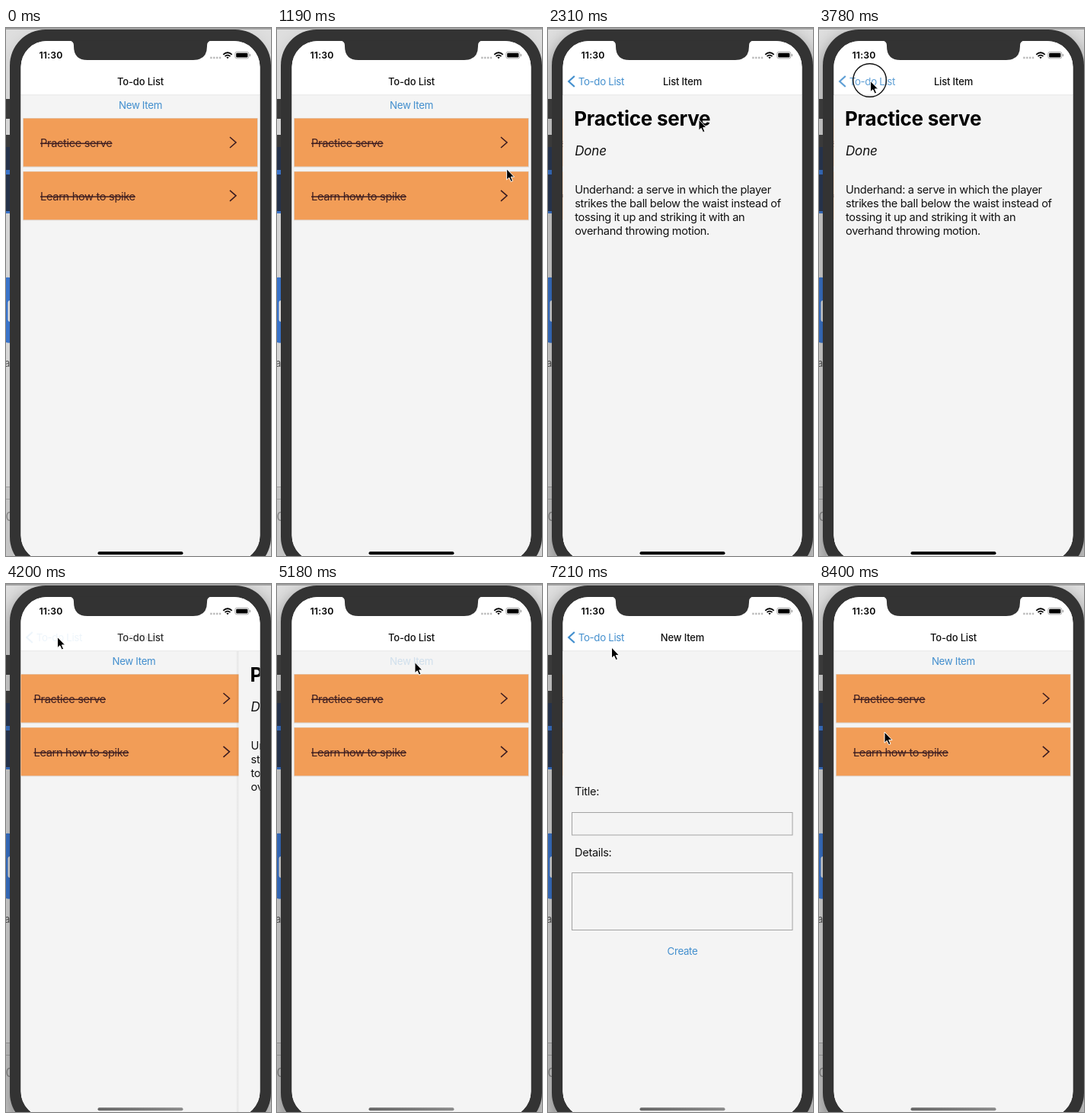
An HTML page that plays this animation: 348 px wide and 692 px high, repeating every 8.47 s.

```html
<!DOCTYPE html>
<html lang="en">
<head>
<meta charset="utf-8">
<title>To-do list</title>
<style>
  html, body { margin: 0; width: 100%; height: 100%; overflow: hidden; background: #333; }
  svg { display: block; width: 348px; height: 692px; }
  text { font-family: Inter, "Open Sans", sans-serif; font-size: 14.6px; letter-spacing: -.32px; fill: #111; }
  .title { font-size: 13px; font-weight: 500; letter-spacing: -.17px; text-anchor: middle; }
  .link { font-size: 13.3px; fill: #438fce; }
  .mid { text-anchor: middle; }
  .item text { fill: #3c1d20; text-decoration: line-through; }
  .item path { fill: none; stroke: #3c1d20; stroke-width: 1.6; }
  .heading { font-size: 26px; font-weight: 700; letter-spacing: -.25px; fill: #000; }
  .status { font-size: 12.3px; font-weight: 600; letter-spacing: .15px; fill: #000; }
  .done { font-size: 17px; font-style: italic; letter-spacing: -.15px; }
  .field { fill: none; stroke: #a3a3a3; }
  .page { fill: #f4f4f4; }
</style>
</head>
<body>
<svg viewBox="0 0 348 692">
  <defs>
    <clipPath id="screen"><rect x="19.5" y="17" width="314" height="682" rx="34"/></clipPath>
    <linearGradient id="edge">
      <stop offset="0" stop-color="#000" stop-opacity="0"/>
      <stop offset="1" stop-color="#000" stop-opacity=".07"/>
    </linearGradient>
    <linearGradient id="barFade">
      <stop offset="0" stop-color="#666"/>
      <stop offset="1" stop-color="#8a8a8a"/>
    </linearGradient>
    <filter id="blur"><feGaussianBlur stdDeviation="10"/></filter>
  </defs>

  <!-- desktop behind the phone -->
  <rect width="348" height="692" fill="#dedede"/>
  <rect y="601" width="10" height="91" fill="#cecece"/>
  <path d="M0 601.5H10M0 617.5H10" stroke="#a5a5a5"/>
  <path d="M0 155H10V243H0ZM0 327Q5 326 10 329V411Q5 414 0 412Z" fill="#3c78d2"/>
  <rect x="2.5" y="357" width="9" height="28" rx="3" fill="#e8e8e8"/>
  <text x="-2" y="444" style="font-size:13px;fill:#555">a</text>
  <text x="-10" y="646" style="font-size:16px;fill:#888">20</text>
  <rect id="shade" x="2" y="8" width="349" height="720" rx="47" filter="url(#blur)"/>
  <rect width="348" height="2" fill="#a2a2a2"/>
  <path d="M0 93H8V119H0ZM0 140H8V156H0Z" fill="#3a3a3a"/>
  <path d="M0 156H8V186H0ZM0 192H8V240H0Z" fill="#25324a"/>

  <!-- phone -->
  <rect x="5" y="2" width="343" height="712" rx="47" fill="#333"/>
  <g clip-path="url(#screen)">
    <rect class="page" width="348" height="692"/>
    <g id="list">
      <rect class="page" x="19" y="88" width="315" height="610"/>
      <text id="newLink" class="link mid" x="176.5" y="106">New Item</text>
      <g class="item">
        <rect x="22" y="118" width="309" height="64.5" fill="#dcdad8"/>
        <rect x="22.8" y="118.5" width="307.2" height="63" fill="#f29d57"/>
        <text x="45" y="156">Practice serve</text>
        <path d="M294 143L302 150L294 157"/>
      </g>
      <g class="item" transform="translate(0 69.8)">
        <rect x="22" y="118" width="309" height="64.5" fill="#dcdad8"/>
        <rect x="22.8" y="118.5" width="307.2" height="63" fill="#f29d57"/>
        <text x="45" y="156">Learn how to spike</text>
        <path d="M294 143L302 150L294 157"/>
      </g>
    </g>
    <g id="detail">
      <rect x="15" y="88" width="4" height="610" fill="url(#edge)"/>
      <rect class="page" x="19" y="88" width="316" height="610"/>
      <text class="heading" x="34" y="128">Practice serve</text>
      <text class="done" x="35" y="167">Done</text>
      <text y="217"><tspan x="35">Underhand: a serve in which the player</tspan><tspan x="35" dy="18">strikes the ball below the waist instead of</tspan><tspan x="35" dy="18">tossing it up and striking it with an</tspan><tspan x="35" dy="18">overhand throwing motion.</tspan></text>
    </g>
    <g id="form">
      <rect x="15" y="88" width="4" height="610" fill="url(#edge)"/>
      <rect class="page" x="19" y="88" width="316" height="610"/>
      <text x="35" y="277">Title:</text>
      <rect class="field" x="31.5" y="299.5" width="289.5" height="29.5"/>
      <text x="35" y="356.5">Details:</text>
      <rect class="field" x="31.5" y="378.5" width="289.5" height="75"/>
      <text class="link mid" x="176.5" y="486">Create</text>
    </g>

    <!-- navigation bar -->
    <rect x="19" y="17" width="315" height="70.5" fill="#fff"/>
    <rect x="19" y="87.5" width="315" height=".7" fill="#e2e2e2"/>
    <text id="listTitle" class="title" x="176.5" y="74.7">To-do List</text>
    <text id="detailTitle" class="title" x="176.5" y="74.7">List Item</text>
    <text id="formTitle" class="title" x="176.5" y="74.7">New Item</text>
    <g id="back">
      <path d="M34.8 63L27.2 70L34.8 77" fill="none" stroke="#438fce" stroke-width="2.2"/>
      <text class="link" x="39.7" y="74.8">To-do List</text>
    </g>

    <!-- status bar -->
    <text class="status" x="43.5" y="40">11:30</text>
    <path d="M268.2 39h14" stroke="#bbb" stroke-width="2.4" stroke-dasharray="2.4 1.5"/>
    <path d="M285.3 34.8Q291 29.6 296.7 34.8M287.5 37.2Q291 34 294.5 37.2" fill="none" stroke="#000" stroke-width="1.8"/>
    <path d="M289.3 38.4Q291 37 292.7 38.4L291 40.2Z"/>
    <rect x="300.8" y="31.3" width="18" height="8.6" rx="2.4" fill="none" stroke="#999" stroke-width=".8"/>
    <rect x="302.2" y="32.7" width="15.2" height="5.8" rx="1.2"/>
    <rect x="319.8" y="34" width="1.2" height="3.2" rx=".6" fill="#999"/>
    <rect id="homeBar" x="120.5" y="686.2" width="112" height="4" rx="2"/>
  </g>
  <path d="M83 16.5Q89 17 89 23V24Q89 42 107 42H246Q264 42 264 24V23Q264 17 270 16.5Z" fill="#333"/>

  <g id="cursor">
    <circle id="ring" cx="-1" cy="-1" r="21.8" fill="none" stroke="#111" stroke-width="1.4"/>
    <path d="M0 0V14.2L3.2 11.3L5.6 16.6L8 15.6L5.7 10.4H10Z" stroke="#fff" stroke-width="1"/>
  </g>
</svg>
<script>
  const LOOP = 8470, TICK = 70, WIDTH = 315;
  const ui = {};
  document.querySelectorAll('[id]').forEach(el => ui[el.id] = el);

  // time, x, y of the pointer tip
  const path = [
    [70, 350, 470], [700, 322, 300], [1400, 296, 153], [2030, 296, 153],
    [2660, 61, 74], [2800, 59.5, 74], [3010, 63.5, 71], [3150, 67, 69.5],
    [3360, 67.6, 69.5], [4270, 67.6, 69.5], [4690, 179, 99], [4830, 181, 102.5],
    [5400, 181, 102.5], [5880, 173, 148.5], [6160, 170, 315], [6300, 168, 319],
    [6440, 164.5, 329], [6650, 164.5, 329], [7210, 83.5, 83],
    [7420, 81, 70], [8050, 81, 70], [8400, 86, 194]
  ];
  const clicks = [1540, 3780, 4970, 7700];

  const clamp = v => Math.min(1, Math.max(0, v));
  const ease = v => v * v * (3 - 2 * v);

  // critically damped spring, 0 to 1
  function spring(ms) {
    const u = Math.max(0, ms) * Math.sqrt(1000 / 3) / 1000;
    return 1 - Math.exp(-u) * (1 + u);
  }

  const shown = (t, open, close) => spring(t - open) * (1 - spring(t - close));

  // touch feedback: fade down to 20 %, then recover
  const touch = (t, start) =>
    1 - .8 * (ease(clamp((t - start) / 150)) - ease(clamp((t - start - 180) / 250)));

  function pointer(t) {
    const i = path.findIndex(k => k[0] > t);
    if (i < 0) return path[path.length - 1].slice(1);
    if (i === 0) return path[0].slice(1);
    const [t0, x0, y0] = path[i - 1], [t1, x1, y1] = path[i];
    const k = ease((t - t0) / (t1 - t0));
    return [x0 + (x1 - x0) * k, y0 + (y1 - y0) * k];
  }

  const move = (el, x, y = 0) =>
    el.setAttribute('transform', `translate(${x.toFixed(2)} ${y.toFixed(2)})`);
  const fade = (el, v) => el.setAttribute('opacity', v.toFixed(3));

  function placeCard(el, amount) {
    move(el, WIDTH * (1 - amount));
    fade(el, amount > .005 ? 1 : 0);
  }

  function draw(t) {
    const detail = shown(t, 1773, 3980);
    const form = shown(t, 5240, 7900);
    const open = Math.max(detail, form);

    move(ui.list, -.3 * WIDTH * open);
    placeCard(ui.detail, detail);
    placeCard(ui.form, form);

    fade(ui.listTitle, (1 - open) ** 1.5);
    fade(ui.detailTitle, detail);
    fade(ui.formTitle, form);
    fade(ui.back, open * touch(t, 3740) * touch(t, 7660));
    fade(ui.newLink, touch(t, 5030));

    // the window comes to the front on the first click
    fade(ui.shade, t < clicks[0] ? .08 : .3);
    ui.homeBar.setAttribute('fill', t < 4130 ? '#000' : 'url(#barFade)');

    move(ui.cursor, ...pointer(t));
    fade(ui.cursor, t < TICK ? 0 : 1);
    fade(ui.ring, clicks.some(c => t >= c && t < c + 3 * TICK) ? 1 : 0);
  }

  const start = performance.now();
  function frame() {
    const t = (performance.now() - start) % LOOP;
    draw(Math.floor(t / TICK) * TICK);
    requestAnimationFrame(frame);
  }
  frame();
</script>
</body>
</html>
```
